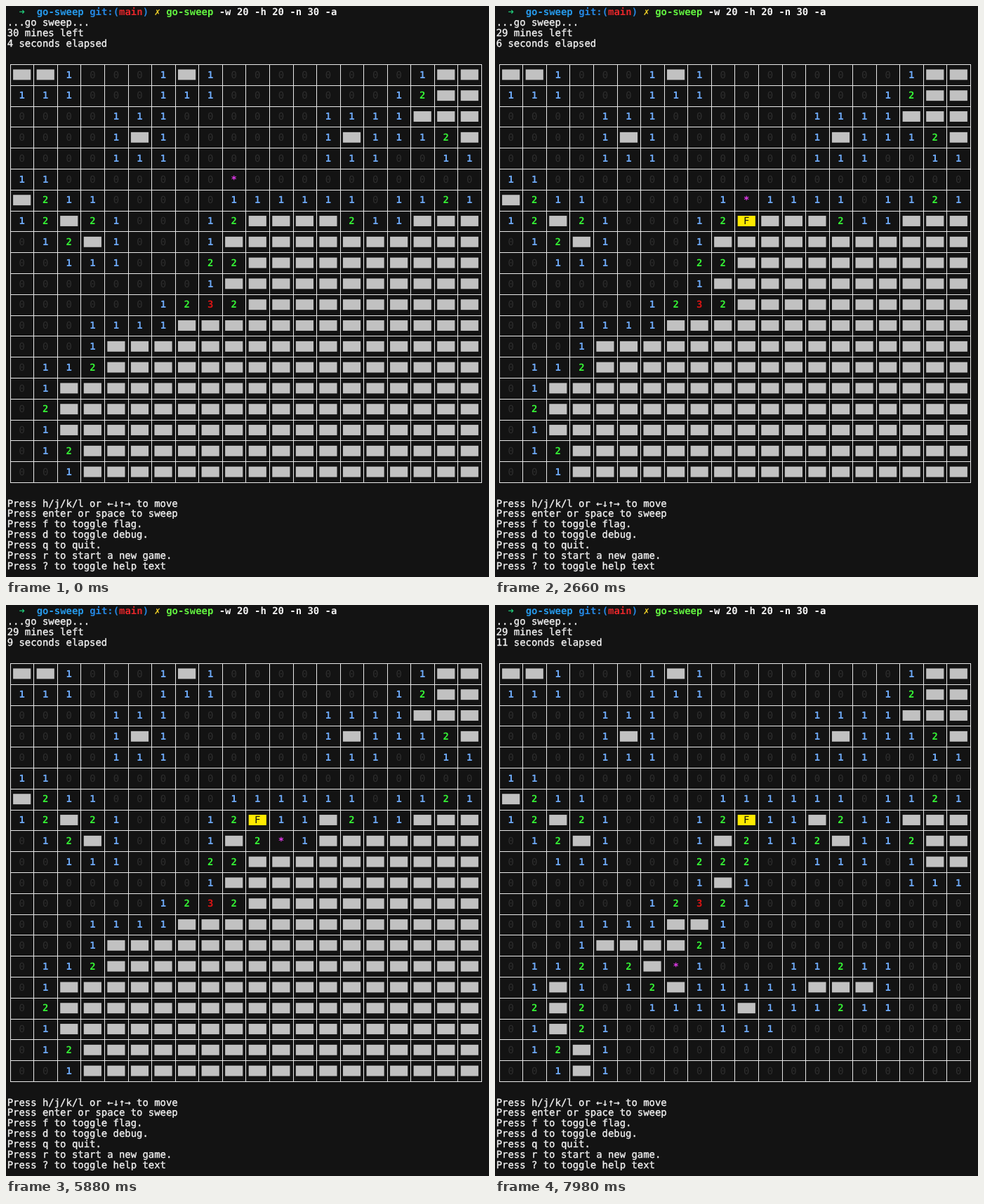
Recreate the animation shown at these times as an HTML page. Size 688 by 814 pixels, loop 8 s.

```html
<!DOCTYPE html>
<html lang="en">
<head>
<meta charset="utf-8">
<title>go-sweep</title>
<style>
  html, body { margin: 0; width: 100%; height: 100%; overflow: hidden; background: #131313; }
  svg { display: block; width: 688px; height: 814px; }
  text {
    font: 13.93px "DejaVu Sans Mono", monospace;
    fill: currentColor; stroke: currentColor; stroke-width: .35px;
    white-space: pre; text-rendering: geometricPrecision;
  }
  .bold { font-weight: bold; stroke: none; }
  .faint { stroke: none; }
  path { stroke: #e8e8e8; fill: none; shape-rendering: crispEdges; }
</style>
</head>
<body>
<svg id="stage" viewBox="0 0 688 814"></svg>
<script>
const LOOP = 8000, SECOND = 1050, SIZE = 20;
const CHAR = 8.39, LINE = 14.9, LEFT = 1.7, MIDDLE = 8.5, BASE = 4.7;
const stage = document.getElementById('stage');

// Mined columns of each row, lettered from a.
const mined = 'bhst - r fot - - a cknrt djo s j - hi e g chnp k c d -'.split(' ');

// Bursts of evenly spaced key presses: [first, last, keys]
const bursts = [
  [560, 1400, 'jjjlkk'], [2310, 2660, 'jfk'], [3080, 3780, 'hl'], [3920, 3920, 'lj'],
  [4200, 4200, ' '], [4410, 4550, 'kj'], [4900, 4900, ' '], [5390, 5530, 'jj'],
  [5880, 5880, 'k'], [6160, 6160, ' '], [6510, 7210, 'jjjjjj'], [7490, 7980, 'hhhh']
];
const steps = { h: [0, -1], j: [1, 0], k: [-1, 0], l: [0, 1] };

const colors = {
  0: '#2e2e2e', 1: '#6eaaf8', 2: '#35f335', 3: '#dc1414',
  '*': '#e23aea', F: '#131313'
};

function add(tag, attrs, content = '') {
  const el = document.createElementNS('http://www.w3.org/2000/svg', tag);
  for (const key in attrs) el.setAttribute(key, attrs[key]);
  el.textContent = content;
  return stage.appendChild(el);
}

function write(line, column, content, color = '#f2f2f2', style = '') {
  return add('text', {
    x: LEFT + column * CHAR, y: MIDDLE + line * LINE + BASE, color, class: style
  }, content);
}

// Prompt, status and help
let column = 2;
[
  ['➜  ', '#20c878'], ['go-sweep ', '#2699ea'], ['git:(', '#2587e2'], ['main', '#e6262a'],
  [') ', '#2587e2'], ['✗ ', '#f4d327'], ['go-sweep ', '#62f340'],
  ['-w 20 -h 20 -n 30 -a', '#f6f6f6']
].forEach(([content, color]) => {
  write(0, column, content, color, 'bold');
  column += content.length;
});

write(1, 0, '...go sweep...');
const minesText = write(2, 0, '');
const timeText = write(3, 0, '');

[
  'Press h/j/k/l or ←↓↑→ to move',
  'Press enter or space to sweep',
  'Press f to toggle flag.',
  'Press d to toggle debug.',
  'Press q to quit.',
  'Press r to start a new game.',
  'Press ? to toggle help text'
].forEach((content, i) => write(47 + i, 0, content));

let lines = '';
for (let i = 0; i <= SIZE; i++) {
  const x = Math.floor(6.3 + i * 4 * CHAR) + .5;
  const y = Math.floor(83.5 + i * 2 * LINE) + .5;
  lines += `M${x} 83V680M6 ${y}H678`;
}
add('path', { d: lines });

// Board: every cell keeps the time at which it opens or gets its flag.
const cells = mined.map((letters, r) => Array.from({ length: SIZE }, (_, c) => ({
  r, c,
  mine: letters.includes(String.fromCharCode(97 + c)),
  opened: Infinity, flagged: Infinity, shown: '',
  block: add('rect', {
    x: LEFT + (4 * c + 1) * CHAR, y: MIDDLE + (2 * r + 5.5) * LINE,
    width: 3 * CHAR, height: LINE
  }),
  label: write(2 * r + 6, 4 * c + 2, '')
})));
const all = cells.flat();

function near(cell) {
  return all.filter(o => o !== cell && Math.abs(o.r - cell.r) < 2 && Math.abs(o.c - cell.c) < 2);
}
for (const cell of all) {
  cell.around = near(cell);
  cell.count = cell.around.filter(o => o.mine).length;
}

function open(cell, time) {
  if (cell.mine || cell.opened <= time) return;
  cell.opened = time;
  if (!cell.count) cell.around.forEach(o => open(o, time));
}

function sweep(cell, time) {
  if (cell.opened < time) cell.around.forEach(o => open(o, time));
  else open(cell, time);
}

// Play the game once and log where the cursor goes.
let cursor = cells[5][9];
const trail = [{ time: 0, cell: cursor }];
[cursor, cells[9][9], cells[11][9]].forEach(cell => open(cell, 0));

for (const [first, last, keys] of bursts) {
  [...keys].forEach((key, i) => {
    const time = first + (last - first) * i / Math.max(1, keys.length - 1);
    if (key === ' ') sweep(cursor, time);
    else if (key === 'f') cursor.flagged = time;
    else {
      const [dr, dc] = steps[key];
      cursor = cells[cursor.r + dr][cursor.c + dc];
      trail.push({ time, cell: cursor });
    }
  });
}

function symbolAt(cell, t) {
  if (cell.flagged <= t) return 'F';
  return cell.opened <= t ? String(cell.count) : '#';
}

function show(cell, symbol) {
  if (cell.shown === symbol) return;
  cell.shown = symbol;
  const { block, label } = cell;
  block.setAttribute('fill', { '#': '#c1c1c1', F: '#ffea00' }[symbol] || 'none');
  label.textContent = symbol === '#' ? '' : symbol;
  label.setAttribute('color', colors[symbol] || 'transparent');
  label.setAttribute('class', '0F'.includes(symbol) ? 'faint' : 'bold');
}

function render(t) {
  const here = trail.findLast(stop => stop.time <= t).cell;
  const flags = all.filter(cell => cell.flagged <= t).length;
  minesText.textContent = `${30 - flags} mines left`;
  timeText.textContent = `${4 + Math.floor(t / SECOND)} seconds elapsed`;
  for (const cell of all) show(cell, cell === here ? '*' : symbolAt(cell, t));
}

const start = performance.now();
function tick() {
  render((performance.now() - start) % LOOP);
  requestAnimationFrame(tick);
}
tick();
</script>
</body>
</html>
```
